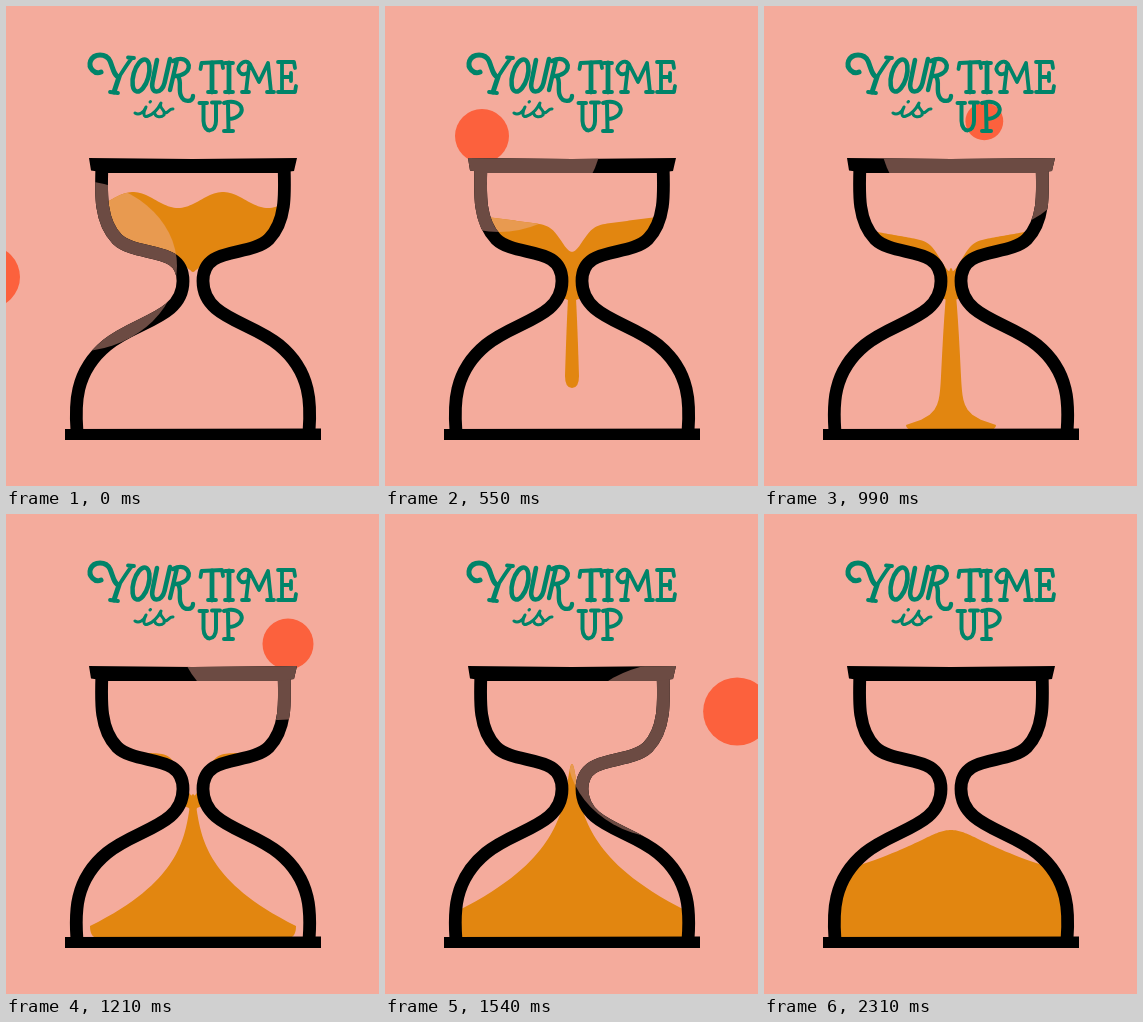
Recreate the animation shown at these times as an HTML page. Size 373 px wide and 480 px high, loop 2420 ms.

```html
<!DOCTYPE html>
<html lang="en">
<head>
<meta charset="utf-8">
<title>Your time is up</title>
<style>
html, body { margin: 0; width: 100%; height: 100%; overflow: hidden; background: #f4ab9c; }
svg { display: block; width: 100vw; height: 100vh; }
.line { fill: none; stroke-linecap: round; stroke-linejoin: round; }
</style>
</head>
<body>
<svg viewBox="0 0 373 480" role="img" aria-label="Your time is up">
  <defs>
    <path id="wall" d="M96 158C95 187 93.500 215 111 233C131 252 177 239 177 275C177 312 130 315 101 339C68 366 69 400 71 426"/>
    <clipPath id="inside">
      <path d="M96 158C95 187 93.500 215 111 233C131 252 177 239 177 275C177 312 130 315 101 339C68 366 69 400 71 426H303C305 400 306 366 273 339C244 315 197 312 197 275C197 239 243 252 263 233C280.500 215 279 187 278 158Z"/>
    </clipPath>
    <clipPath id="lit"><ellipse id="halo" rx="104"/></clipPath>
    <g id="sand" clip-path="url(#inside)" fill="currentColor">
      <path id="top"/>
      <path id="heap"/>
    </g>
    <g id="glass" fill="currentColor">
      <g fill="none" stroke="currentColor" stroke-width="12.8">
        <use href="#wall"/>
        <use href="#wall" transform="matrix(-1 0 0 1 374 0)"/>
      </g>
      <path d="M83 152L187 153L291 152L288 165L272 167H102L85 164.500ZM59 423L315 422.500V434H59Z"/>
    </g>
  </defs>
  <rect width="373" height="480" fill="#f4ab9c"/>
  <use href="#sand" color="#e28610"/>
  <g clip-path="url(#lit)"><use href="#sand" color="#e89a50"/></g>
  <circle id="ball" fill="#fc613d"/>
  <use href="#glass" color="#000"/>
  <g clip-path="url(#lit)"><use href="#glass" color="#6c4b43"/></g>
  <g class="line" stroke="#008469" stroke-width="3.8">
    <!-- YOUR -->
    <path stroke-width="5" d="M95 66C89 69 82 62 84.500 55C88 47 100 47 104 55C107 62 108 70 113 71L108 86"/>
    <path d="M126 52C121 58 117 65 113 71M122 51.500L128 52M104 86L112 87"/>
    <ellipse cx="135" cy="69.500" rx="7.500" ry="16.500" transform="rotate(16 135 69.500)" stroke-width="4.600"/>
    <path stroke-width="4.600" d="M151 54L146.500 76C144 89 156 88 158.500 77L164 53"/>
    <path stroke-width="4.400" d="M171 54L164 84M167 55C182 48 187 62 179 67C175 70 172 70 168 70M172 70C176 76 172 84 175 90C178 97 187 96 187 90"/>
    <!-- TIME -->
    <path d="M194.500 63L195.500 57L216 56L217 62M202 86H210M219 57H227M219 86H227"/>
    <path stroke-width="4.800" d="M206 57V86M223 57V86"/>
    <path d="M241 67C235 71 230 64 234 59C238 54 243 55 245 60L253 76L262 57L265 86M243 60L240 86M236 86H243M261 86H268"/>
    <path d="M289 62L288 56H272M276 56V86M276 71H285M285 67V75M272 86H289L290 80"/>
    <!-- is UP -->
    <path stroke-width="3" d="M129 107C133 110 138 106 140 101C137 107 137 112 142 110C148 108 152 103 155 97C152 103 161 104 158 109C155 112 150 111 149 108M158 107C163 108 163 102 167 103M144 96L144.500 95.500"/>
    <path stroke-width="4" d="M193.500 97H201M206 96.500H214M197.500 97V115C198 128 210 127 210 115V97"/>
    <path stroke-width="4" d="M222 97L222.500 124M218 97C238 91 243 111 223 113M218 125H227"/>
  </g>
</svg>
<script>
const STEP = 110, COUNT = 22, MID = 187, GONE = 16;
const el = id => document.getElementById(id);

function setAttrs(id, attrs) {
  for (const name in attrs) el(id).setAttribute(name, attrs[name]);
}

// Blend between poses, each holding its step in "at".
function blend(poses, n) {
  const i = poses.findIndex(p => p.at > n);
  if (i < 0) return poses[poses.length - 1];
  const a = poses[i - 1], b = poses[i], k = (n - a.at) / (b.at - a.at);
  const out = {};
  for (const key in a) out[key] = a[key] + (b[key] - a[key]) * k;
  return out;
}

// Upper sand: a wavy level that turns into a funnel and drains.
const levels = [
  { at: 0, level: 194, slope: 0, dip: 0, wave: 8, tip: 268 },
  { at: 5, level: 211, slope: 11, dip: 24, wave: 0, tip: 300 },
  { at: 9, level: 224, slope: 15, dip: 27, wave: 0, tip: 300 },
  { at: 11, level: 237, slope: 4, dip: 41, wave: 0, tip: 300 },
  { at: 14, level: 246, slope: 4, dip: 30, wave: 0, tip: 300 },
  { at: GONE, level: 290, slope: 0, dip: 0, wave: 0, tip: 300 }
];

function topPath(n) {
  const { level, slope, dip, wave, tip } = blend(levels, n);
  let d = 'M84 255';
  for (let x = 84; x <= 290; x += 2) {
    const off = Math.abs(x - MID);
    const y = level + slope * (1 - off / 85) + dip * Math.exp(-((off / 15) ** 2)) +
      wave * Math.cos((x - 172) / 90 * 2 * Math.PI);
    d += `L${x} ${y}`;
  }
  return d + `L290 255L191 ${tip - 6}Q${MID} ${tip + 2} 183 ${tip - 6}Z`;
}

// Lower sand: half width = neck * sqrt(v) + spread * v^power, from peak to edge.
const heaps = [
  { at: 0, peak: 255, edge: 262, floor: 264, neck: 5, spread: 0, power: 18 },
  { at: 5, peak: 255, edge: 370, floor: 382, neck: 7, spread: 0, power: 18 },
  { at: 9, peak: 262, edge: 419, floor: 424, neck: 12, spread: 33, power: 18 },
  { at: 11, peak: 280, edge: 412, floor: 424, neck: 10, spread: 93, power: 2.8 },
  { at: 14, peak: 250, edge: 402, floor: 430, neck: 12, spread: 113, power: 2.8 },
  { at: 17, peak: 305, edge: 370, floor: 440, neck: 16, spread: 114, power: 1.5 },
  { at: 21, peak: 316, edge: 366, floor: 440, neck: 55, spread: 85, power: 1.8 }
];

function heapPath(n) {
  const { peak, edge, floor, neck, spread, power } = blend(heaps, n);
  const width = v => neck * Math.sqrt(v) + spread * v ** power;
  const side = sign => {
    const points = [];
    for (let i = 0; i <= 60; i++) {
      const v = (i / 60) ** 2;
      points.push(`${MID + sign * width(v)} ${peak + (edge - peak) * v}`);
    }
    return points;
  };
  const end = width(1), foot = end - Math.min(end, 8);
  return `M${side(1).join('L')}Q${MID + end} ${floor} ${MID + foot} ${floor}` +
    `H${MID - foot}Q${MID - end} ${floor} ${side(-1).reverse().join('L')}Z`;
}

// Soft light that travels with the ball.
const halos = [
  { at: 0, cx: 67, cy: 260, ry: 86 },
  { at: 5, cx: 114, cy: 122, ry: 104 },
  { at: 9, cx: 219, cy: 122, ry: 104 },
  { at: 11, cx: 272, cy: 102, ry: 104 },
  { at: 14, cx: 286, cy: 237, ry: 88 },
  { at: GONE, cx: 490, cy: 237, ry: 88 }
];

// Leap on to the bar, hop along it, then fall away to the right.
function ballAt(n) {
  if (n < 5) {
    const s = 5 - n;
    return { cx: 97 - 22.8 * s, cy: 130 - 12 * s + 8.04 * s * s, r: 27 + 0.8 * s };
  }
  if (n < 11) {
    const u = (n - 5) / 6, arc = 4 * u * (1 - u);
    return { cx: 97 + 185 * u, cy: 130 - 16.5 * arc, r: 27 - 1.5 * u - 8 * arc };
  }
  const s = n - 11;
  return { cx: 282 + 23.4 * s, cy: 130 - 12 * s + 11.5 * s * s, r: 25.5 + 2.85 * s };
}

function draw(n) {
  const { cx, cy, ry } = blend(halos, n);
  setAttrs('halo', { cx, cy, ry });
  setAttrs('ball', ballAt(n));
  setAttrs('top', { d: n < GONE ? topPath(n) : '' });
  setAttrs('heap', { d: heapPath(n) });
}

const start = performance.now();
function tick() {
  const t = Math.max(0, performance.now() - start);
  draw(Math.floor(t / STEP) % COUNT);
  requestAnimationFrame(tick);
}
tick();
</script>
</body>
</html>
```
